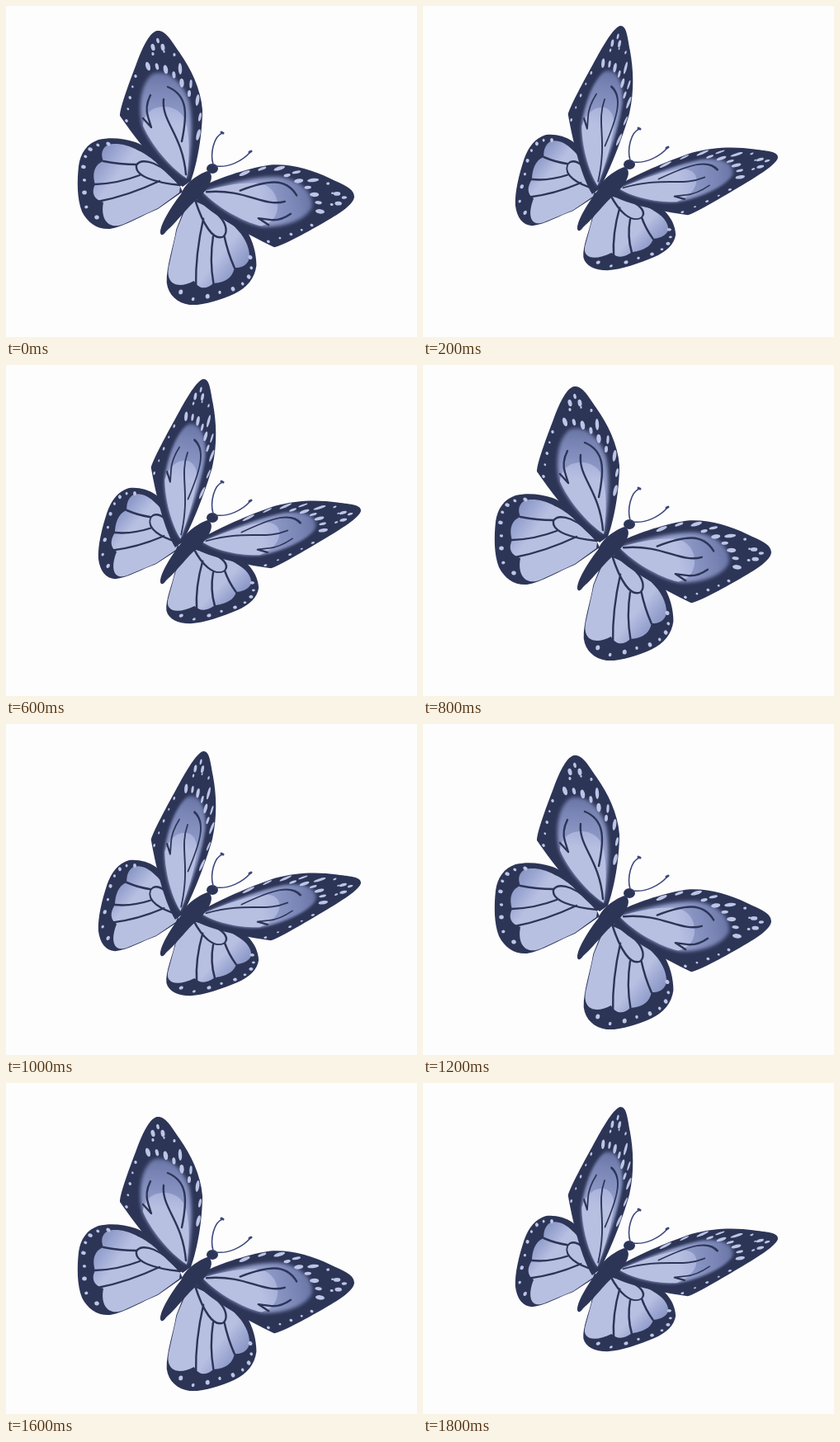
Recreate the animation shown at these times as an HTML page. Size 498 px wide and 401 px high, loop 2000 ms.

```html
<!DOCTYPE html>
<html lang="en">
<head>
<meta charset="utf-8">
<title>Butterfly</title>
<style>
  html, body { margin: 0; width: 100%; height: 100%; overflow: hidden; background: #fdfdfd; }
  svg { display: block; width: 498px; height: 401px; }
  .dark { fill: #2d3557; }
  .vein { fill: none; stroke: #2d3557; stroke-width: 2.4; stroke-linecap: round; stroke-linejoin: round; }
  .spots { fill: #bcc5e6; }
  .feeler { fill: none; stroke: #3d477c; stroke-width: 1.6; stroke-linecap: round; }
</style>
</head>
<body>
<svg viewBox="0 0 498 401">
  <defs>
    <linearGradient id="cell" gradientUnits="userSpaceOnUse" x1="190" y1="76" x2="186" y2="145">
      <stop offset="0" stop-color="#636f9f"/>
      <stop offset=".3" stop-color="#7783b3"/>
      <stop offset="1" stop-color="#98a3d0"/>
    </linearGradient>
    <linearGradient id="glow" gradientUnits="userSpaceOnUse" x1="190" y1="118" x2="188" y2="142">
      <stop offset="0" stop-color="#a4aed8"/>
      <stop offset="1" stop-color="#b8c0e2"/>
    </linearGradient>
    <linearGradient id="pane" gradientUnits="userSpaceOnUse" x1="112" y1="174" x2="142" y2="196">
      <stop offset="0" stop-color="#8490bf"/>
      <stop offset=".5" stop-color="#9ca7d2"/>
      <stop offset="1" stop-color="#b8c0e2"/>
    </linearGradient>
    <filter id="soft" x="-10%" y="-10%" width="120%" height="120%">
      <feGaussianBlur stdDeviation="2"/>
    </filter>

    <g id="fore">
      <path class="dark" d="M183 30C193 29 199 40 210 56C224 76 236 100 238 126C238 155 232 190 224 212L214 219C188 200 160 165 138 133C138 122 152 86 158 70C164 54 173 32 183 30Z"/>
      <path fill="url(#cell)" filter="url(#soft)" d="M219 208C196 194 172 164 165 143C160 118 164 92 178 82C198 76 215 94 222 116C227 142 224 180 219 208Z"/>
      <path fill="url(#glow)" d="M219 209C197 194 175 166 166 145C167 130 178 121 194 122C207 123 217 132 219 145C223 165 222 190 219 209Z"/>
      <path class="vein" d="M191 113C188 140 214 156 218 204M196 98C220 108 220 130 213 164M175 108Q168 122 172 134L176 147L166 136"/>
      <g class="spots" id="foreSpots"></g>
    </g>

    <g id="hind">
      <path class="dark" d="M214 225C202 196 176 172 157 165C142 160 126 159 112 162C98 167 90 178 88 194C86 212 86 234 92 249C99 263 111 271 126 270C144 267 166 253 184 246Z"/>
      <path fill="url(#pane)" d="M211 219C190 194 172 180 160 175C146 167 130 165 122 169C114 175 116 183 118 188C105 193 105 206 108 216C103 226 106 234 118 238C114 258 124 272 143 264L184 245L210 226Z"/>
      <path class="vein" d="M118 188Q138 192 158 192M108 216Q136 215 162 205M111 237Q148 230 186 212M211 217C180 214 156 206 158 193C164 182 190 190 211 217"/>
      <g class="spots" id="hindSpots"></g>
    </g>

    <g id="body">
      <path class="dark" d="M188 277C183 272 198 245 212 228C217 214 233 204 244 200C254 204 248 219 233 233C222 241 207 262 194 273C192 276 190 278 188 277Z"/>
      <ellipse class="dark" cx="250" cy="197" rx="7" ry="6"/>
      <path class="feeler" d="M251 192C247 178 252 158 262 154M254 194C270 196 286 188 296 177"/>
      <path class="feeler" style="stroke-width:3" d="M261 153l2 1M295 177l2 -1"/>
    </g>
  </defs>
  <g id="open"></g>
  <g id="half"></g>
</svg>
<script>
const $ = id => document.getElementById(id);

// A row of n spots along a quadratic curve, each pointing at the wing base
function spotRow(wing, [bx, by], p, c, q, n, rx, ry) {
  let row = "";
  for (let i = 0; i < n; i++) {
    const t = i / (n - 1), s = 1 - t;
    const [x, y] = [0, 1].map(k => s * s * p[k] + 2 * s * t * c[k] + t * t * q[k]);
    const tilt = Math.atan2(by - y, bx - x) * 180 / Math.PI - 90;
    const size = i % 2 ? 0.75 : 1;
    row += `<ellipse rx="${rx * size}" ry="${ry * size}" transform="translate(${x} ${y}) rotate(${tilt})"/>`;
  }
  $(wing + "Spots").innerHTML += row;
}

// Anchors: base, outer corner, and tip or lower corner
const anchors = {
  fore: [[218, 215], [138, 132], [183, 30]],
  hind: [[212, 224], [100, 167], [115, 270]]
};

const foreRow = spotRow.bind(null, "fore", anchors.fore[0]);
foreRow([178, 50], [184, 34], [190, 50], 3, 2.4, 4.2);   // tip
foreRow([178, 58], [192, 52], [204, 59], 3, 1.6, 2);
foreRow([172, 73], [200, 70], [222, 106], 6, 2.7, 5.5);  // across
foreRow([211, 76], [242, 112], [233, 156], 5, 2.2, 7);   // right edge
foreRow([157, 85], [149, 110], [146, 139], 5, 1.7, 2);   // left edge

const hindRow = spotRow.bind(null, "hind", anchors.hind[0]);
hindRow([124, 167], [88, 166], [95, 211], 6, 2.2, 2.8);
hindRow([95, 226], [92, 246], [110, 256], 3, 2.5, 2.8);

// Affine matrix that carries three anchor points to three others
function affine(from, to) {
  const [[x, y], [x1, y1], [x2, y2]] = from;
  const a = x1 - x, b = y1 - y, c = x2 - x, d = y2 - y, det = a * d - b * c;
  const axis = i => {
    const p = to[1][i] - to[0][i], q = to[2][i] - to[0][i];
    const u = (p * d - q * b) / det, v = (a * q - c * p) / det;
    return [u, v, to[0][i] - u * x - v * y];
  };
  const [m, n, e] = axis(0), [o, r, f] = axis(1);
  return `matrix(${[m, o, n, r, e, f]})`;
}

const wing = (name, ...to) => `<use href="#${name}" transform="${affine(anchors[name], to)}"/>`;
const body = '<use href="#body"/>';

$("open").innerHTML =
  wing("hind", ...anchors.hind) +
  wing("hind", [222, 236], [301, 328], [197, 346]) +
  wing("fore", ...anchors.fore) +
  wing("fore", [232, 227], [326, 292], [422, 231]) + body;

$("half").innerHTML =
  wing("hind", [208, 234], [138, 165], [124, 270]) +
  wing("hind", [220, 236], [304, 292], [197, 317]) +
  wing("fore", [209, 229], [176, 135], [239, 29]) +
  wing("fore", [231, 229], [322, 258], [430, 189]) + body;

// Height of the body per step; open and half-closed wings alternate
const heights = [0, -5, -8, -12, -4, 4, 8, 12, 11, 0];
const STEP = 200;
const start = performance.now();

function draw() {
  const t = Math.max(0, performance.now() - start);
  const i = Math.floor(t / STEP) % heights.length;
  const [on, off] = i % 2 ? ["half", "open"] : ["open", "half"];
  $(on).setAttribute("transform", `translate(0 ${heights[i]})`);
  $(on).style.display = "";
  $(off).style.display = "none";
  requestAnimationFrame(draw);
}
draw();
</script>
</body>
</html>
```
